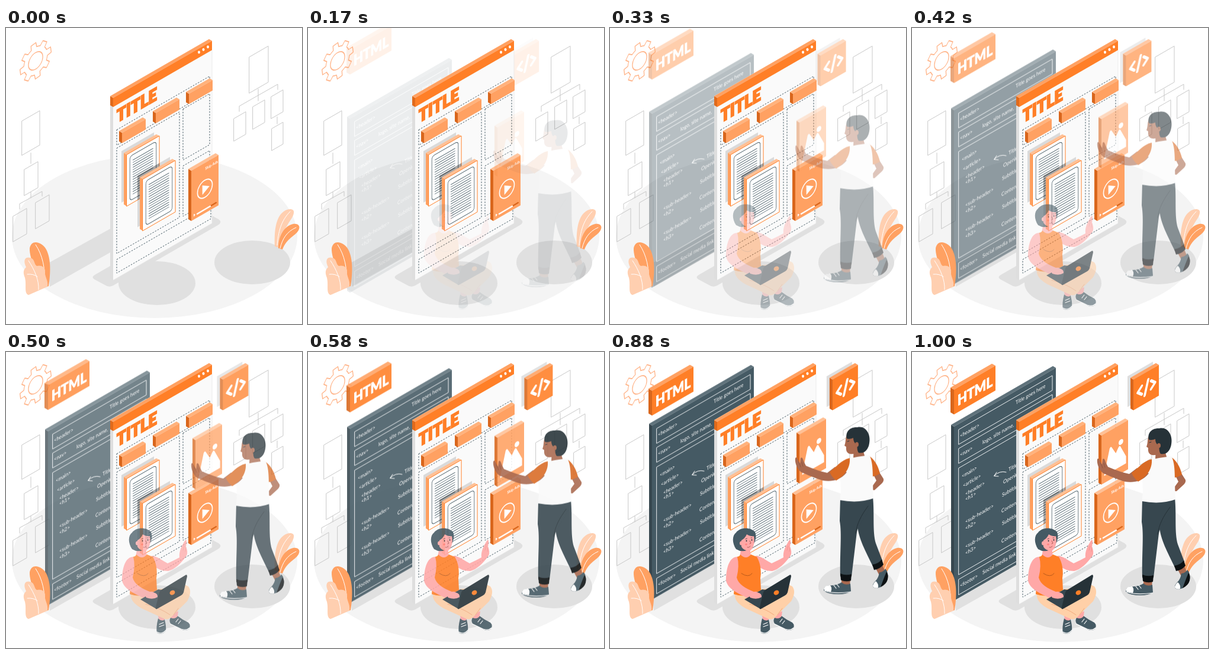
These frames come from a looping animation (500 by 500 pixels, 1040 ms). An HTML page with a canvas:

```html
<!DOCTYPE html>
<html lang="en">
<head>
<meta charset="utf-8">
<title>Building a web page</title>
<style>
html, body { margin: 0; width: 100%; height: 100%; overflow: hidden; background: #fff; }
canvas { display: block; width: 500px; height: 500px; }
</style>
</head>
<body>
<canvas id="stage" width="500" height="500"></canvas>
<script>
const SIZE = 500, LOOP = 1040, RISE = 1000, SHIFT = 30, K = 0.577;
const ORANGE = '#ff7f27', MID = '#ffa162', PALE = '#ffcfb0', RUST = '#d9661c';
const DARK = '#37474f', INK = '#263238', SLATE = '#455a64', BLACK = '#0d1113';
const GREY = '#e0e0e0', WHITE = '#fff', SHADE = 'rgba(0,0,0,.13)';
const SKIN = '#a9694f', PINK = '#ffa8a7';
const stage = document.getElementById('stage').getContext('2d');
let c;

function layer(draw) {
  const cv = document.createElement('canvas');
  cv.width = cv.height = SIZE;
  c = cv.getContext('2d');
  c.lineCap = c.lineJoin = 'round';
  draw();
  return cv;
}
function fill(color, d) {
  c.fillStyle = color;
  c.fill(new Path2D(d));
}
function line(color, width, d) {
  c.strokeStyle = color;
  c.lineWidth = width;
  c.stroke(new Path2D(d));
}
function oval(color, x, y, rx, ry = rx, turn = 0) {
  c.fillStyle = color;
  c.beginPath();
  c.ellipse(x, y, rx, ry, turn, 0, Math.PI * 2);
  c.fill();
}
// Upright parallelogram: top left corner, screen width, height
const face = (x, y, w, h) => `M${x} ${y}l${w} ${-w * K}v${h}l${-w} ${w * K}z`;
function slab(x, y, w, h, d, front, side, top) {
  fill(side, `M${x} ${y}l${-d} ${-d * K}v${h}l${d} ${d * K}z`);
  fill(top, `M${x} ${y}l${w} ${-w * K}l${-d} ${-d * K}l${-w} ${w * K}z`);
  fill(front, face(x, y, w, h));
}
function iso(x, y, draw) {
  c.save();
  c.transform(0.866, -0.5, 0, 1, x, y);
  draw();
  c.restore();
}
function label(text, x, y, size = 9, color = WHITE, weight = 400, heft = 0) {
  iso(x, y, () => {
    c.font = `${weight} ${size}px Lato, sans-serif`;
    c.fillStyle = c.strokeStyle = color;
    c.fillText(text, 0, 0);
    if (!heft) return;
    c.lineJoin = 'miter';
    c.lineWidth = heft;
    c.strokeText(text, 0, 0);
  });
}

function gear() {
  iso(50, 55.5, () => {
    const teeth = 8, step = Math.PI * 2 / teeth;
    c.beginPath();
    for (let i = 0; i < teeth; i++) {
      const a = i * step - .14;
      [[-.3, 23], [-.2, 30.5], [.2, 30.5], [.3, 23]].forEach(([k, r]) =>
        c.lineTo(r * Math.cos(a + k * step), r * Math.sin(a + k * step)));
      c.arc(0, 0, 23, a + .3 * step, a + .7 * step);
    }
    c.closePath();
    c.moveTo(14, 0);
    c.arc(0, 0, 14, 0, Math.PI * 2);
    c.strokeStyle = '#ffb68c';
    c.lineWidth = 1.5;
    c.stroke();
  });
}

function wires() {
  const box = (...a) => line('#c8c8c8', 1, face(...a));
  box(27, 157, 30, 58);
  box(31, 239, 23, 44);
  box(12, 318, 23, 43);
  box(50, 295, 23, 44);
  line('#c8c8c8', 1, 'M42 211V229M42 277V287M23 306V297L61 276V284');
  box(411, 49, 32, 61);
  box(385, 153, 20, 38);
  box(417, 133, 20, 38);
  box(448, 116, 20, 37);
  box(449, 170, 19, 37);
  line('#c8c8c8', 1, 'M426 103V123M394 141V132L459 95V104M458 150V162');
}

function backdrop() {
  oval('#f4f4f4', 251, 352, 241, 138);
  fill(GREY, 'M70 398L178 338V378L74 437Z');
  fill(GREY, 'M150 417L330 313Q338 310 346 316L359 323Q366 328 358 333L181 435Q174 439 167 434L150 425Q143 421 150 417Z');
  oval(GREY, 255, 431, 65, 37);
  oval(GREY, 416, 396, 64, 37);
  wires();
  gear();
}

function panel() {
  slab(71, 126, 172, 294, 5, SLATE, DARK, '#5f727b');
  [[131, 25], [163, 25], [196, 180], [384, 26]].forEach(([y, h]) => line('#eceff1', 1, face(79, y, 158, h)));
  label('<header>', 81, 145);
  label('Title goes here', 175, 89);
  label('<nav>', 81, 177);
  label('logo, site name,', 119, 156);
  label('<main>', 84, 213);
  label('<article>', 86, 229);
  label('<header>', 90, 243);
  label('<h1>', 90, 252);
  label('<sub-header>', 90, 290);
  label('<h2>', 90, 301);
  label('<sub-header>', 90, 332);
  label('<h3>', 90, 343);
  label('Title', 163, 202);
  label('Opening', 154, 223);
  label('Subtitle', 152, 245);
  label('Content', 151, 272);
  label('Subtitle', 152, 293);
  label('Content', 151, 323);
  label('<footer>', 81, 398);
  label('Social media links', 119, 376);
  line(WHITE, 1, 'M159 203Q148 200 139 209M143 203L138.500 209.500L146 210');
}

function htmlBox() {
  slab(71, 63.5, 70, 42, 6, ORANGE, RUST, MID);
  label('HTML', 77, 91, 24, WHITE, 700, 1.3);
}

function codeBox() {
  fill(SHADE, face(364, 41, 43, 52));
  slab(374, 46.5, 43, 52, 5, ORANGE, RUST, MID);
  iso(396, 60, () => line(WHITE, 4.6, 'M-9 -7L-17 0L-9 7M9 -7L17 0L9 7M3.500 -12L-3.500 12'));
}

function doc(x, y) {
  fill(SHADE, face(x - 9, y - 6, 55, 87));
  slab(x, y, 55, 87, 5, WHITE, MID, '#ffc095');
  line(ORANGE, 1, face(x, y, 55, 87));
  iso(x, y, () => {
    c.strokeStyle = SLATE;
    c.lineWidth = .9;
    c.beginPath();
    c.roundRect(6, 6, 51.5, 75, 5);
    c.stroke();
    let d = '';
    for (let i = 0; i < 15; i++) d += `M12 ${15 + i * 4.1}h39`;
    line(SLATE, .9, d);
  });
}

function videoCard() {
  slab(313, 241, 46, 85, 5, MID, RUST, '#ffc095');
  label('Skip Ads', 336.5, 240, 6.5, WHITE, 700);
  iso(336, 271.5, () => {
    c.strokeStyle = WHITE;
    c.lineWidth = 1.8;
    c.beginPath();
    c.arc(0, 0, 14.5, 0, Math.PI * 2);
    c.stroke();
    fill(WHITE, 'M-5 -8L9 0L-5 8Z');
  });
  fill(WHITE, 'M317 314V319L320 315Z');
  line(RUST, 2.2, 'M345 301L355 295');
  line(WHITE, 2.5, 'M323 314L345 301');
}

function page() {
  slab(181, 118, 167, 308, 5, '#fafafa', '#dedede', WHITE);
  line('#e8e8e8', .8, 'M348 38V330L181 426');
  slab(181, 118, 167, 15.5, 5, ORANGE, '#e06a1c', MID);
  [[326, 41], [333.5, 36.5], [341, 32]].forEach(([x, y]) => oval(WHITE, x, y, 2, 2.4));
  label('TITLE', 187, 160.5, 30, ORANGE, 900, 2);

  c.save();
  c.setLineDash([2.5, 2.3]);
  c.lineCap = 'butt';
  const zone = (...a) => line(SLATE, 1, face(...a));
  zone(187, 172, 157, 26);
  zone(187, 203, 106, 178);
  zone(299, 137, 45, 86);
  zone(299, 233, 45, 85);
  zone(187, 391, 159, 23);
  c.restore();

  [[196, 177], [253, 143.5], [309, 111]].forEach(([x, y]) => slab(x, y, 40, 17.5, 5, MID, RUST, '#ffb27c'));
  doc(204, 214);
  c.save();
  c.clip(new Path2D(face(204, 214, 55, 87)));
  fill('rgba(0,0,0,.25)', face(222, 249.5, 55, 87));
  c.restore();
  doc(231, 255.5);
  videoCard();
}

function imageCard() {
  slab(320, 141, 45, 83, 5, MID, RUST, '#ffc095');
  iso(320, 141, () => {
    oval(WHITE, 38, 30, 4.5);
    fill(WHITE, 'M5 71L16 30Q18 27 20 30L28 44L33 37Q35 34 37 37L48 59V71Z');
  });
}

function plants() {
  fill(MID, 'M64 439C55 420 39 390 40 372C43 357 58 361 66 371C76 385 76 412 72 436Z');
  line(WHITE, 1, 'M50 366C62 384 66 405 66 433');
  fill(PALE, 'M38 451C30 448 35 435 32 422C28 412 30 408 34 404C29 394 31 386 40 388C49 389 47 399 52 402C58 400 66 403 66 410C64 418 72 426 70 437Z');
  line(WHITE, 1, 'M38 393C48 408 56 426 55 442M36 416Q46 415 53 420');
  fill(PALE, 'M454 369C453 344 455 317 472 308C480 304 488 306 486 313C484 325 468 334 462 371Z');
  line(WHITE, 1, 'M480 310C464 326 460 345 458 367');
  fill(MID, 'M460 372C460 350 471 334 485 331C494 330 498 335 494 342C488 352 475 354 467 374Z');
  line(WHITE, 1, 'M490 337C474 344 467 356 463 372');
}

function man() {
  // far arm
  fill(SKIN, 'M444 207L455 205L462 216Q463 220 459 224L447 235Q442 236 442 230L450 219Z');
  fill('#d96a24', 'M437 177C446 182 453 194 456 207Q449 212 443 212Z');
  // shoes and ankles
  fill(SKIN, 'M391 385H406L405 398H391ZM448 366L460 361L465 374L455 379Z');
  fill(SLATE, 'M391 391Q398 397 406 393L407 406Q400 411 386 411Q368 411 361 405Q360 399 369 396Q382 397 391 391Z');
  fill(WHITE, 'M361 402Q364 395 372 396Q376 401 373 407L363 405Z');
  line(WHITE, 1.2, 'M362 405Q378 411 406 407M378 396L382 401M383 394L387 399');
  fill(SLATE, 'M455 374Q461 374 465 368Q470 372 469 384Q468 393 457 399Q447 403 444 398Q443 394 448 389Q454 383 455 374Z');
  fill(BLACK, 'M457 399Q461 388 467 373Q471 378 469 386Q467 394 457 399Z');
  fill(WHITE, 'M444 398Q444 393 449 389Q454 393 453 400Q447 402 444 398Z');
  // trousers
  fill(DARK, 'M414 260L444 246C447 275 443 305 449 325L460 354L444 364C431 336 420 318 418 295Z');
  fill(DARK, 'M389 248L443 248C440 275 421 289 417 306L408 381H389C388 340 392 310 388 287Z');
  line(INK, 1, 'M436 262C424 278 417 292 415 308');
  fill(BLACK, 'M389 376Q398 380 408 377L407 388Q398 391 390 387ZM443 361Q453 360 459 352L462 361Q455 369 446 370Z');
  // shirt
  fill(SKIN, 'M412 160H425L431 180Q420 189 411 181Z');
  fill('#fafafa', 'M403 182Q421 178 438 176C446 190 443 215 445 249Q420 258 388 252C392 235 388 220 389 198Z');
  // near arm
  fill(SKIN, 'M380 196L400 205C388 220 372 221 360 219C346 215 333 209 323 205C315 198 312 188 313 181Q315 178 317 183L321 190L322 181Q325 178 327 186L331 194Q352 203 367 206Z');
  line('#7f4b38', .6, 'M319 188L322 196M324 188L326 195');
  fill('#d96a24', 'M405 181C406 195 400 208 382 219Q373 211 371 204C382 197 390 184 405 181Z');
  // head
  fill(SKIN, 'M400 142C397 148 399 153 396 160L399 162C398 171 402 175 411 174L425 169L426 140Z');
  fill(INK, 'M400 148C397 137 405 128 418 129C432 126 441 141 438 156C436 167 430 174 420 172C417 168 418 163 417 158C413 156 411 152 411 147Q404 150 400 148Z');
  oval(SKIN, 417, 158, 3, 4);
  line(INK, 1, 'M401 153L404 152');
}

function woman() {
  // legs
  fill(PINK, 'M257 444L270 443L267 455H258ZM277 442L291 438L289 452L279 453Z');
  fill('#ffd0a8', 'M212 403C208 416 214 424 229 433L266 450Q273 454 280 447L306 421Q315 405 308 396Q298 389 286 398L250 401Z');
  line('#f3a97c', 1, 'M236 426Q260 432 277 444M283 444L291 433');
  // shoes
  fill(SLATE, 'M257 450Q263 456 268 452Q271 464 270 471Q263 479 255 474Q253 466 257 450Z');
  fill(SLATE, 'M278 449Q286 452 290 446Q299 453 308 457Q313 462 309 468Q303 472 295 468L278 459Q275 453 278 449Z');
  line(WHITE, 1.2, 'M255 473Q263 478 270 470M277 459L296 468Q305 471 310 466M259 460L266 457M259 464L267 461M287 456L291 451M291 459L295 454');
  // raised arm
  fill(PINK, 'M246 344C256 345 265 353 273 357Q284 352 293 347C292 337 296 329 302 319Q305 315 305 322L304 329Q308 338 305 344C296 357 284 368 274 370Q259 370 247 360Z');
  line('#ee8f87', .7, 'M301 328L299 335M304 330L303 337');
  // body
  fill(PINK, 'M222 329H236L238 345Q230 353 219 346Z');
  fill(ORANGE, 'M214 346Q220 345 220 342Q230 352 238 342L248 346C254 356 256 370 254 382L255 402Q232 417 209 409C212 390 206 366 214 346Z');
  line('#b85a1c', 1, 'M222 374Q234 382 240 374');
  fill(PINK, 'M215 346C202 346 196 364 196 386C199 401 218 408 231 415L251 417Q258 416 257 410Q251 404 243 405C229 399 217 393 214 381Q219 361 215 346Z');
  // head
  fill(SLATE, 'M213 333C206 323 206 310 213 305C219 296 237 295 245 304C249 313 244 324 239 330Q226 341 213 333Z');
  fill(PINK, 'M222 318Q228 315 231 308Q238 312 243 311C245 321 243 332 236 336Q226 336 222 329Z');
  oval(PINK, 222, 323, 3, 3.6);
  oval(INK, 230.500, 319, .9, 1.2);
  oval(INK, 239.500, 317.500, .9, 1.2);
  oval('#ff8583', 230, 325, 2, 1.5);
  line('#9c4a44', .8, 'M232 330Q235 331 237 328M236 319L238 323L236 324');
  line(INK, .7, 'M229 316L231.500 315M238 314L240 314');
  // laptop
  fill(DARK, 'M227 418L257 401L281 404L254 434Z');
  fill(PINK, 'M233 408L249 406Q257 408 256 414Q248 419 237 415Z');
  fill(INK, 'M262 402L303 377Q306 375 306 379L300 406Q299 409 296 411L255 434Q252 435 253 431L259 406Q260 403 262 402Z');
  oval(ORANGE, 281, 406.500, 4.6, 3.8, -.5);
}

const base = layer(backdrop), front = layer(page), leaves = layer(plants);
const code = [panel, htmlBox, codeBox].map(layer);
const picture = layer(imageCard), him = layer(man), her = layer(woman);

function bezier(x) {
  const at = (u, a, b) => 3 * (1 - u) * (1 - u) * u * a + 3 * (1 - u) * u * u * b + u * u * u;
  let lo = 0, hi = 1;
  for (let i = 0; i < 30; i++) {
    const u = (lo + hi) / 2;
    if (at(u, .36, .5) < x) lo = u; else hi = u;
  }
  return at(lo, -.01, 1.38);
}

function render(now) {
  const t = now % LOOP;
  const p = t >= RISE ? 1 : bezier(t / RISE);
  const off = (1 - p) * SHIFT;
  const alpha = Math.max(0, Math.min(1, p));
  const put = img => stage.drawImage(img, 0, 0);
  // Moving parts fade in while sliding from (dx, dy) to their place
  const enter = (img, dx, dy) => {
    stage.globalAlpha = alpha;
    stage.drawImage(img, dx * off, dy * off);
    stage.globalAlpha = 1;
  };
  stage.fillStyle = WHITE;
  stage.fillRect(0, 0, SIZE, SIZE);
  put(base);
  enter(code[0], 0, 1);
  enter(code[1], 0, -1);
  enter(code[2], -1, 0);
  put(front);
  enter(picture, 0, 1);
  put(leaves);
  enter(him, 0, 1);
  enter(her, 0, 0);
}

let start;
function tick(now) {
  if (start === undefined) start = now;
  render(now - start);
  requestAnimationFrame(tick);
}
render(0);
requestAnimationFrame(tick);
</script>
</body>
</html>
```
